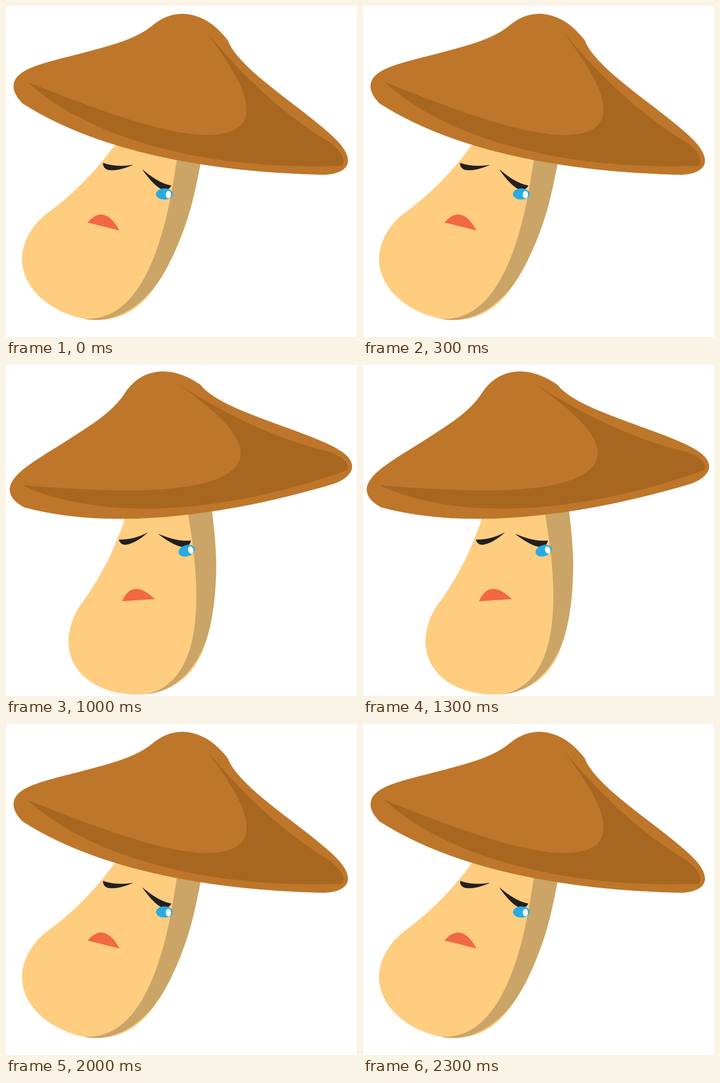
These frames come from a looping animation (771 px wide and 726 px high, 2500 ms). An HTML page:

```html
<!DOCTYPE html>
<html lang="en">
<head>
<meta charset="utf-8">
<title>Sad mushroom</title>
<style>
  html, body { margin: 0; width: 100%; height: 100%; overflow: hidden; background: #fff; }
  svg { display: block; width: 100%; height: 100%; }
  #stem { fill: #ffcd80; stroke: #ffcd80; }
  #shade { fill: #caa567; stroke: #caa567; stroke-width: .6; }
  #cap { fill: #be762a; stroke: #be762a; }
  #fold { fill: #a86720; }
  #eyes { fill: #231f20; stroke: #231f20; stroke-width: .6; }
  #mouth { fill: #f26843; stroke: #f26843; stroke-width: .5; }
</style>
</head>
<body>
<svg viewBox="0 0 771 726">
  <g id="mushroom">
    <path id="stem" d="M262 286 L242 325 C207 392 165 449 112 500
      C88 526 75 560 74.5 588 C74.5 660 148 710 235 713
      C302 712 348 676 375 616 C395 578 412 520 422 460 C428 424 431 380 433 325 L433 286 Z"/>
    <path id="shade" d="M380 320 C381 400 378 462 370 512 C355 612 318 704 232 713
      C292 715 343 675 375 616 C395 578 412 520 422 460 C428 424 431 380 433 320 Z"/>
    <path id="cap" d="M27 265 C10 252 1 238 2 225 C3 191 69 168 129 142.5
      C195 114.5 250 92.5 283 57 C328 5 394 7 452 63 C483 119 612 175 693 226.5
      C731 250 752 270 752 290 C752 306 732 319 705 323.5 C440 357 198 342 27 265 Z"/>
    <path id="fold" d="M30 217 C180 253 300 278 391 278 C470 278 516 257 516 217
      C516 165 450 99 402 51 C485 125 590 204 702 250 C728 262 751 283 740 299
      C460 351 190 325 30 217 Z"/>
    <g id="eyes">
      <path d="M221 369 C222 379 230 383 238 382 C255 381 272 372 285 364 C264 371 242 373 221 369 Z"/>
      <path d="M309 371 C325 388.5 345 405 360 408 C368 408 374 403 376 396.5 C352 395 330 384 309 371 Z"/>
    </g>
    <g id="tear" transform="translate(363.8 416.7) rotate(-8.35)">
      <ellipse rx="18.4" ry="12.2" fill="#29abe2"/>
      <ellipse cx="8.9" cy="1.3" rx="5.8" ry="8.2" fill="#fff"/>
    </g>
    <path id="mouth" d="M206.5 503 C215 489 226 481 237 481.5 C252 482 265 494 277.5 510 Z"/>
  </g>
</svg>
<script>
  const STEP = 500;
  const left = "translate(48.4 -52.8) rotate(8.35)";
  const middle = "translate(.5 .5)";
  const right = "translate(-29.2 54.5) rotate(-9.25)";
  const poses = [left, middle, right, middle, left];
  const mushroom = document.getElementById("mushroom");
  const start = performance.now();

  // The sway is stepped: each pose holds, then snaps to the next.
  function draw(ms) {
    const i = Math.floor(ms / STEP) % poses.length;
    mushroom.setAttribute("transform", poses[i]);
  }

  function tick() {
    draw(performance.now() - start);
    requestAnimationFrame(tick);
  }
  draw(0);
  requestAnimationFrame(tick);
</script>
</body>
</html>
```
